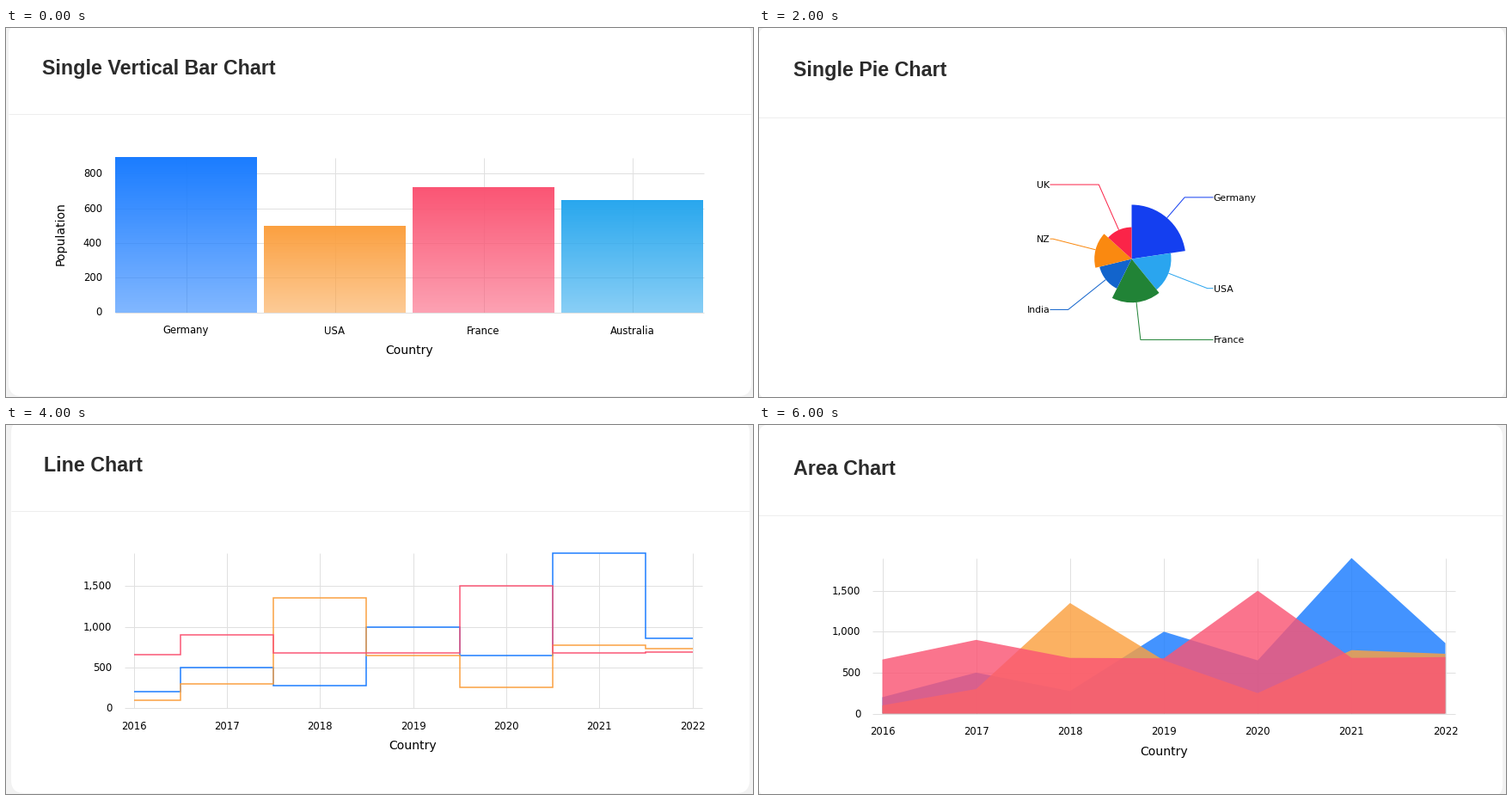
These frames come from a looping animation (869x429 px, 7000 ms). A matplotlib script:

```python
import math

import matplotlib.pyplot as plt
import numpy as np
from matplotlib.animation import FuncAnimation
from matplotlib.colors import to_rgb
from matplotlib.patches import FancyBboxPatch, Rectangle, Wedge

W, H, DPI = 869, 429, 64
PX = 72 / DPI  # points per pixel

BLUE, ORANGE, PINK, CYAN = "#1a7cff", "#fba040", "#fa5574", "#28a7ee"
GRID = "#e0e0e0"
COUNTRIES = ["Germany", "USA", "France", "India", "NZ", "UK"]
TOTALS = [8940000, 6523140, 7200000, 5458796, 6145687, 5234567]
PIE_COLORS = ["#143ff0", "#2aa5ef", "#218336", "#1264cc", "#fa8910", "#fb2448"]
SERIES = [
    [200, 500, 275, 1000, 650, 1900, 860],
    [100, 300, 1350, 650, 250, 775, 730],
    [660, 900, 680, 675, 1500, 680, 690],
]
LINE_COLORS = [BLUE, ORANGE, PINK]
YEARS = range(2016, 2023)

fig = plt.figure(figsize=(W / DPI, H / DPI), dpi=DPI, facecolor="#f2f2f2")


def text(ax, x, y, s, size=11.6, ha="center", font="DejaVu Sans", color="black", **kw):
    ax.text(x, y, s, fontsize=size * PX, ha=ha, va="baseline", family=font,
            color=color, zorder=5, **kw)


def line(ax, xs, ys, color=GRID, width=1.0, z=2):
    ax.plot(xs, ys, color=color, lw=width * PX, zorder=z,
            solid_capstyle="butt", solid_joinstyle="miter")


def card(title, title_x, title_y, left, right, rule):
    """New stage-sized axes with a white card, its heading and the rule below."""
    ax = fig.add_axes((0, 0, 1, 1))
    ax.set_xlim(0, W)
    ax.set_ylim(H, 0)
    ax.axis("off")
    top, bottom = rule - 105.5, rule + 328.5
    ax.add_patch(FancyBboxPatch(
        (left, top), right - left, bottom - top, fc="white", ec="none", zorder=0,
        boxstyle="round,pad=0,rounding_size=15"))
    line(ax, [left, right], [rule, rule], "#eeeeee")
    text(ax, title_x, title_y, title, 23.3, "left", "Liberation Sans", "#2b2b2b",
         weight="bold")
    return ax


def y_axis(ax, y0, scale, ticks, left, right, label_x):
    for t in ticks:
        y = y0 - t * scale
        line(ax, [left, right], [y, y])
        text(ax, label_x, y + 4, f"{t:,}", ha="right")


def axis_names(ax, x, y, pop_x=None, pop_y=None):
    text(ax, x, y, "Country", 14)
    if pop_x is not None:
        text(ax, pop_x, pop_y, "Population", 14, rotation=90, rotation_mode="anchor")


def bar(ax, x, width, y0, height, color):
    """Bar of one-pixel rows, fading from solid at the top to half clear."""
    top, bottom = math.floor(y0 - height + 0.5), math.floor(y0 + 0.5)
    rows = bottom - top
    rgba = np.empty((rows, 1, 4))
    rgba[..., :3] = to_rgb(color)
    rgba[..., 3] = np.linspace(1, 0.55, rows)[:, None]
    ax.pcolormesh([x, x + width], np.arange(top, bottom + 1), rgba, zorder=3)


def single_bars():
    ax = card("Single Vertical Bar Chart", 42, 54, 3, 867, 99.5)
    y0, scale, width = 330.5, 0.2015, 165
    y_axis(ax, y0, scale, range(0, 801, 200), 126.5, 811.5, 112)
    bars = [("Germany", 894, BLUE), ("USA", 500, ORANGE),
            ("France", 720, PINK), ("Australia", 650, CYAN)]
    for i, (name, value, color) in enumerate(bars):
        x = 127 + i * (width + 8)
        mid = x + width / 2
        line(ax, [mid, mid], [150.5, y0])
        bar(ax, x, width, y0, value * scale, color)
        text(ax, mid, 355.5, name)
    axis_names(ax, 469, 379, 67.5, 239)


def grouped_bars():
    ax = card("Multiple Vertical Bar Chart", 37, 54, -2, 865, 100.5)
    y0, scale = 332, 0.0953
    y_axis(ax, y0, scale, range(0, 1501, 500), 131, 810, 117)
    colors = [BLUE, ORANGE, PINK, CYAN, BLUE, ORANGE, PINK]
    for g, values in enumerate(SERIES):
        left = 138 + 226 * g
        if g != 1:
            ax.add_patch(Rectangle((left, 151), 213, y0 - 151, fc="#f1f1f1",
                                   ec="none", zorder=1))
        for i, (value, color) in enumerate(zip(values, colors)):
            bar(ax, left + 23 + 25 * i, 17, y0, value * scale, color)
        text(ax, left + 106.5, 357, COUNTRIES[g])
    axis_names(ax, 470, 381, 62.5, 240)


def polar_pie():
    ax = card("Single Pie Chart", 39.5, 56, -1, 868, 103.5)
    cx, cy, radius = 433.5, 268.5, 63
    start = 0
    for name, value, color in zip(COUNTRIES, TOTALS, PIE_COLORS):
        sweep = 360 * value / sum(TOTALS)
        r = radius * value / max(TOTALS)
        ax.add_patch(Wedge((cx, cy), r, start - 90, start + sweep - 90,
                           fc=color, ec="none", zorder=3))
        mid = math.radians(start + sweep / 2)
        dx, dy = math.sin(mid), -math.cos(mid)
        side = 1 if dx > 0 else -1
        end_x, elbow = cx + 95 * side, 1.5 * radius
        line(ax, [cx + r * dx, cx + elbow * dx, end_x],
             [cy + r * dy, cy + elbow * dy, cy + elbow * dy], color)
        text(ax, end_x, cy + elbow * dy + 4, name, 10.9,
             "left" if side > 0 else "right")
        start += sweep


def ring_grid():
    ax = card("Grid Pie Chart", 40, 58, 1, 868, 105.5)
    for i, (name, value, color) in enumerate(zip(COUNTRIES, TOTALS, PIE_COLORS)):
        x, y = 180.5 + 249 * (i % 3), 208.5 + 105 * (i // 3)
        share = value / sum(TOTALS)
        end = 360 * share - 90
        for a, b, alpha in [(-90, end, 1), (end, 270, 0.42)]:
            ax.add_patch(Wedge((x, y), 37.5, a, b, width=4, fc=color, ec="none",
                               alpha=alpha, zorder=3))
        text(ax, x, y - 2.5, f"{share:.0%}", 16, font="Liberation Sans")
        text(ax, x, y + 11.5, name)
        text(ax, x, y + 52.5, f"Total: {value:,}", 11.8)


def year_chart(ax, x0, x1, y0, scale, left, label_x):
    """Grid and labels of a year chart; gives back the x places of the years."""
    y_axis(ax, y0, scale, range(0, 1501, 500), left, 810, label_x)
    xs = np.linspace(x0, x1, len(YEARS))
    for x, year in zip(xs, YEARS):
        line(ax, [x, x], [y0 - 1900 * scale, y0])
        text(ax, x, y0 + 25, str(year))
    axis_names(ax, (x0 + x1) / 2, y0 + 48.5)
    return xs


def step_lines():
    ax = card("Line Chart", 44.5, 54, 6, 865, 99.5)
    y0, scale = 329, 0.0945
    xs = year_chart(ax, 148.5, 798.5, y0, scale, 138, 123.5)
    mids = (xs[:-1] + xs[1:]) / 2
    step_x = np.concatenate([xs[:1], np.repeat(mids, 2), xs[-1:]])
    for values, color in zip(SERIES, LINE_COLORS):
        line(ax, step_x, y0 - np.repeat(values, 2) * scale, color, 1.5, 3)


def straight_lines():
    ax = card("Line Chart", 41.5, 57, 3, 864, 102.5)
    y0, scale = 332.5, 0.0946
    xs = year_chart(ax, 146, 798.5, y0, scale, 135, 121)
    for values, color in zip(SERIES, LINE_COLORS):
        line(ax, xs, y0 - np.array(values) * scale, color, 1.5, 3)


def areas():
    ax = card("Area Chart", 40, 58, -1, 865, 104.5)
    y0, scale = 335.5, 0.0952
    xs = year_chart(ax, 143.5, 798.5, y0, scale, 132, 118.5)
    for values, color in zip(SERIES, LINE_COLORS):
        ys = y0 - np.array(values) * scale
        ax.fill([xs[0], *xs, xs[-1]], [y0, *ys, y0], fc=color, ec="none",
                alpha=0.82, zorder=3)


SLIDES = [single_bars, grouped_bars, polar_pie, ring_grid,
          step_lines, straight_lines, areas]
for build in SLIDES:
    build()


def show(index):
    for i, ax in enumerate(fig.axes):
        ax.set_visible(i == index)
    return fig.axes


anim = FuncAnimation(fig, show, frames=len(SLIDES), interval=1000,
                     repeat=True, repeat_delay=0, blit=False)
plt.show()
```
